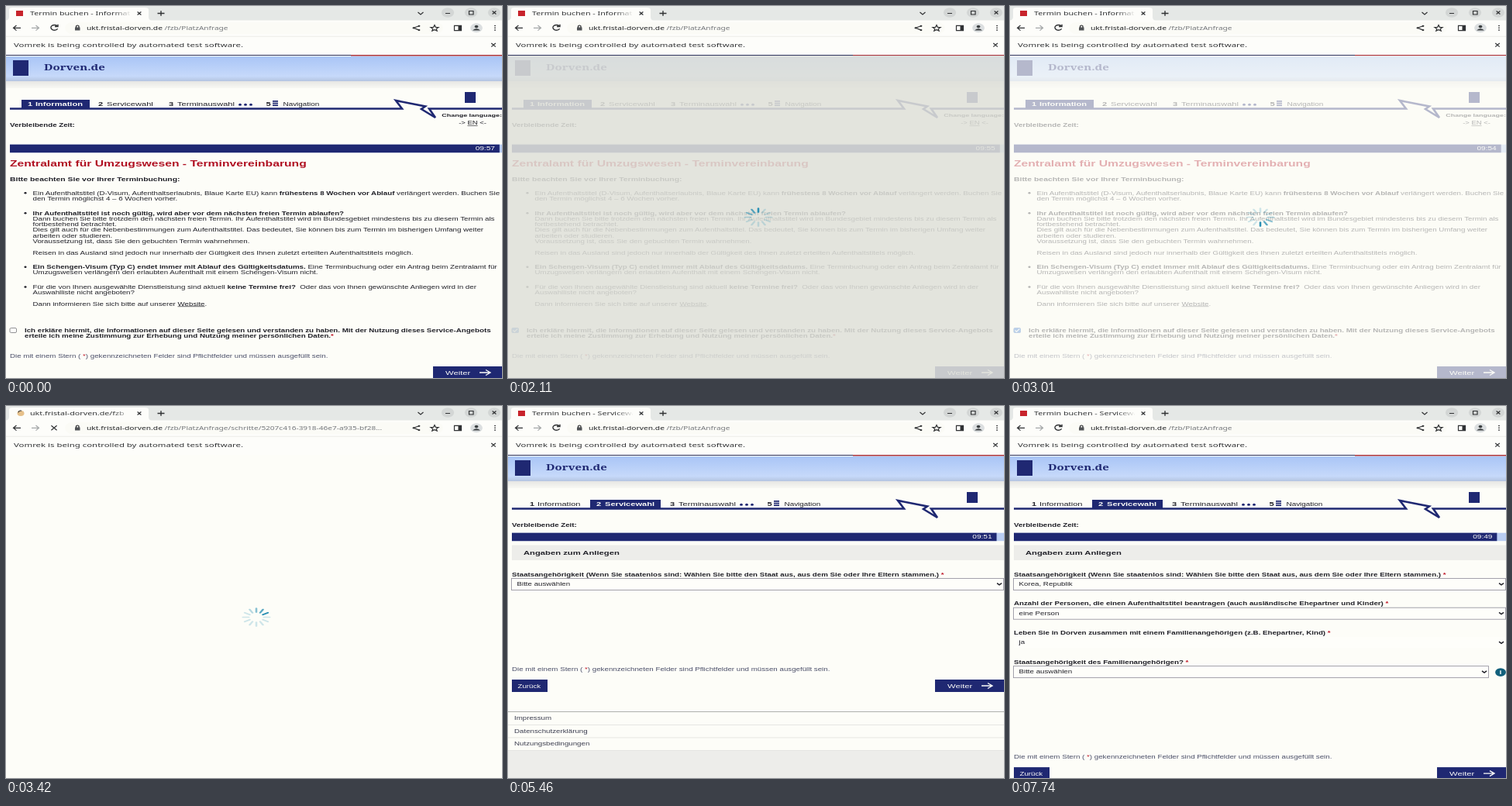
These frames come from a looping animation (640x480 px, 8 s). An HTML page:

```html
<!DOCTYPE html>
<html lang="de">
<head>
<meta charset="utf-8">
<title>Termin buchen</title>
<style>
html, body { margin: 0; width: 100%; height: 100%; overflow: hidden; background: #fdfdf8; }
svg { display: block; width: 640px; height: 480px; }
text { font-family: "Liberation Sans", Arial, sans-serif; fill: #202028; }
.ui text { font-family: "Noto Sans", "Open Sans", sans-serif; fill: #303234; }
.b { font-weight: bold; }
.u { text-decoration: underline; }
.r { fill: #c01828; }
.ln { fill: none; stroke: #303234; stroke-width: 1.2; }
</style>
</head>
<body>
<svg id="stage" viewBox="0 0 640 480"></svg>
<script>
const LOOP = 8000, WIDE = 1.5, ROW = 37.7;
const NAVY = '#1f2872', PAGE = '#fdfdf8', SKY = '#b9cdf2', BAND = '#ededea', BAR = '#fdfdfa';
const LEAVE = 2110, BLANK = 3300, NEXT = 4150, LOADED = 5030, READY = 5460;

// Markup helpers. The screen is shown 1.5 times too wide, so all text shares one scale.
const rich = s => String(s).replace(/<(\/?)([bur])>/g, (_, end, c) => end ? '</tspan>' : `<tspan class="${c}">`);
const text = (x, y, s, size = 6.5, more = '') =>
  `<text transform="translate(${x} ${y}) scale(${WIDE} 1)" font-size="${size}" ${more}>${rich(s)}</text>`;
const bold = (x, y, s, size, more = '') => text(x, y, s, size, 'font-weight="bold" ' + more);
const white = 'style="fill:#fdfdfa"';
const rect = (x, y, w, h, fill, more = '') =>
  `<rect x="${x}" y="${y}" width="${w}" height="${h}" fill="${fill}" ${more}/>`;
const line = (d, more = '') => `<path class="ln" d="${d}" ${more}/>`;
const dot = (x, y, r, fill) => `<ellipse cx="${x}" cy="${y}" rx="${r * 1.3}" ry="${r}" fill="${fill}"/>`;
const during = (from, to, s) => `<g data-from="${from}" data-to="${to}">${s}</g>`;
const cross = (x, y, r = 2.5) =>
  line(`M${x - r * 1.2} ${y - r}l${r * 2.4} ${r * 2}m0 ${-r * 2}l${-r * 2.4} ${r * 2}`);

function browser() {
  const host = 'ukt.fristal-dorven.de', path = '/fzb/PlatzAnfrage';
  const title = s => text(31, 12.3, s, 7.15);
  const tail = s => text(204.5, 31, s, 6.7, 'style="fill:#73767a"');
  const reload = line('M66 25.6A4.6 3.4 0 1 0 66.6 29.4M67 23.8v2.7h-4', 'style="stroke-width:1.4"');
  const brand = rect(13, 6, 9, 7, '#c8242c');
  return `<g class="ui">
    ${rect(0, 0, 640, 19, '#e5e8e6')}
    <path d="M0 18.5Q4 18 4 14V5Q4 2 8 2H179Q184 2 184 5V14Q184 18.5 188 18.5H640V40H0Z" fill="${BAR}"/>
    ${rect(76, 21, 488, 15, '#fbfbf6', 'rx="9" ry="7.5"')}
    ${rect(0, 39, 640, 24, BAR)}
    ${line('M0 39.3H640', 'style="stroke:#e6e7e2;stroke-width:.7"')}
    ${during(0, BLANK, brand + title('Termin buchen - Information'))}
    ${during(BLANK, NEXT, title(host + '/fzb') +
      `<ellipse cx="19" cy="9.5" rx="4.5" ry="3.4" fill="#e6c08a"/>
       <path id="wheel" class="ln" d="M0 -3.4A3.4 3.4 0 0 1 3.4 0"/>`)}
    ${during(NEXT, LOADED, title('Termin buchen') +
      '<ellipse class="ln" cx="18.5" cy="9.5" rx="3.5" ry="3.3"/>' + line('M15.5 10l3-1 1 2 2-3'))}
    ${during(LOADED, LOOP, brand + title('Termin buchen - Servicewahl'))}
    ${rect(138, 4, 24, 13, 'url(#fade)')}${rect(161, 4, 21, 13, BAR)}
    ${cross(172, 9.5, 2)}${line('M195.5 9.5h9M200 6.2v6.6', 'style="stroke-width:1.4"')}
    ${line('M531.5 8l3.5 3 3.5-3')}
    ${[570, 600, 630].map(x => dot(x, 8.5, 6.2, '#d3d6d5')).join('')}
    ${line('M567 9.5h6M597.5 6.5h5.5v4.5h-5.5z')}${cross(630, 8.5, 2)}
    ${line('M19 28.3H10M13.5 25l-4 3.3 4 3.3')}
    ${line('M33 28.3h9M38.5 25l4 3.3-4 3.3', 'style="stroke:#a4a7a8"')}
    ${during(0, BLANK, reload)}${during(BLANK, LOADED, cross(62, 28.3, 3))}${during(LOADED, LOOP, reload)}
    ${rect(89, 27.5, 6.5, 4, '#505356')}${line('M90.5 28v-2q1.7-2 3.5 0v2')}
    ${text(104, 31, host, 6.85, 'style="fill:#202224"')}
    ${during(0, BLANK, tail(path))}
    ${during(BLANK, NEXT, tail(path + '/schritte/5207c416-3918-46e7-a935-bf28...'))}
    ${during(NEXT, LOOP, tail(path))}
    ${line('M533 25.8l-7 2.5 7 2.8')}
    ${dot(533, 25.8, 1.1, '#303234')}${dot(526, 28.3, 1.1, '#303234')}${dot(533, 31.1, 1.1, '#303234')}
    ${line('M553 24.6l1.4 2.7 3.6.2-2.8 1.9 1 2.7-3.2-1.5-3.2 1.5 1-2.7-2.8-1.9 3.6-.2z')}
    ${line('M578.5 25.3h9v6.4h-9z')}${rect(583.5, 25, 4.5, 7, '#303234')}
    ${dot(607, 28.3, 6, '#dcdfe0')}${dot(607, 26.6, 1.8, '#3c4042')}
    <path d="M602 31.5q5-4.5 10 0z" fill="#3c4042"/>
    ${[25.5, 28.3, 31.1].map(y => dot(631, y, .8, '#303234')).join('')}
    ${text(10, 53, 'Vomrek is being controlled by automated test software.', 7.6)}
    ${cross(629, 50.3, 2.3)}
  </g>`;
}

// Banner, step tabs and remaining time; `y` is the top of the time bar.
function header(step, y) {
  const tab = (n, x, gap, name) => n === step
    ? bold(x, 128.7, n, 7.4, white) + bold(x + gap, 128.7, name, 7.4, white)
    : bold(x, 128.7, n, 7.4) + text(x + gap, 128.7, name, 7.4);
  const shift = step - 1;
  return `
    ${rect(0, 62, 640, 418, PAGE)}
    ${rect(0, 65, 640, 32, 'url(#sky)')}${rect(0, 97, 640, 9, 'url(#sand)')}
    ${rect(0, 62, 640, 2, '#2c3260')}${rect(445, 62.5, 195, 2, '#a8303c')}
    ${rect(9, 70, 20, 20, NAVY)}
    ${bold(49, 82.5, 'Dorven.de', 10, `style="font-family:'Noto Serif',serif;fill:${NAVY}"`)}
    ${shift ? rect(106, 121, 91, 12, NAVY) : rect(20, 121, 88, 12, NAVY)}
    ${tab(1, 28, 10, 'Information')}
    ${tab(2, 119 - 5 * shift, 11, 'Servicewahl')}
    ${tab(3, 210 - shift, 11, 'Terminauswahl')}
    ${[302, 309, 316].map(x => dot(x - shift, 127.3, 1.5, NAVY)).join('')}
    ${bold(335.5 - shift, 128.7, 5, 7.4)}
    ${[122, 124.7, 127.4].map(v => rect(344 - shift, v, 7, 1.7, NAVY)).join('')}
    ${text(357.5 - shift, 128.5, 'Navigation', 6.6)}
    <path d="M5 132.5H511L503 122 541 129.5 536 133 554 144 546 132.5H640" fill="none" stroke="${NAVY}" stroke-width="2.6"/>
    ${rect(592, 111, 14, 14, NAVY)}
    ${bold(5, 156.2, 'Verbleibende Zeit:')}
    ${rect(5, y, 635, 10.5, SKY)}${rect(5, y, 14, 10.5, NAVY, `id="bar${step}"`)}
    ${text(0, y + 7.7, '', 6.7, `id="clock${step}" text-anchor="end" ${white}`)}`;
}

const arrow = y => `<path d="M611 ${y}h13M619 ${y - 3.5}l6 3.5-6 3.5" fill="none" stroke="#fdfdfa" stroke-width="1.3"/>`;
const forward = y => rect(551, y, 89, 16, NAVY) + text(567, y + 10.6, 'Weiter', 7.5, white) + arrow(y + 8);
const note = y => text(5, y, 'Die mit einem Stern ( <r>*</r>) gekennzeichneten Felder sind Pflichtfelder und müssen ausgefüllt sein.',
  6.5, 'style="fill:#4a4e68"');

function infoPage() {
  const lines = [
    [243.5, 'Ein Aufenthaltstitel (D-Visum, Aufenthaltserlaubnis, Blaue Karte EU) kann <b>frühestens 8 Wochen vor Ablauf</b> verlängert werden. Buchen Sie', 1],
    [251, 'den Termin möglichst 4 – 6 Wochen vorher.'],
    [269.5, '<b>Ihr Aufenthaltstitel ist noch gültig, wird aber vor dem nächsten freien Termin ablaufen?</b>', 1],
    [276.7, 'Dann buchen Sie bitte trotzdem den nächsten freien Termin. Ihr Aufenthaltstitel wird im Bundesgebiet mindestens bis zu diesem Termin als'],
    [284, 'fortbestehend betrachtet.'],
    [291.3, 'Dies gilt auch für die Nebenbestimmungen zum Aufenthaltstitel. Das bedeutet, Sie können bis zum Termin im bisherigen Umfang weiter'],
    [298.5, 'arbeiten oder studieren.'],
    [305.8, 'Voraussetzung ist, dass Sie den gebuchten Termin wahrnehmen.'],
    [320.7, 'Reisen in das Ausland sind jedoch nur innerhalb der Gültigkeit des Ihnen zuletzt erteilten Aufenthaltstitels möglich.'],
    [339, '<b>Ein Schengen-Visum (Typ C) endet immer mit Ablauf des Gültigkeitsdatums.</b> Eine Terminbuchung oder ein Antrag beim Zentralamt für', 1],
    [346.3, 'Umzugswesen verlängern den erlaubten Aufenthalt mit einem Schengen-Visum nicht.'],
    [364.7, 'Für die von Ihnen ausgewählte Dienstleistung sind aktuell <b>keine Termine frei?</b>&#160; Oder das von Ihnen gewünschte Anliegen wird in der', 1],
    [372, 'Auswahlliste nicht angeboten?'],
    [386.7, 'Dann informieren Sie sich bitte auf unserer <u>Website</u>.']
  ];
  return header(1, 178.7) + `
    ${bold(640, 143.3, 'Change language:', 6, 'text-anchor="end"')}
    ${text(602, 153.3, '-&gt; <u>EN</u> &lt;-', 6.3, 'text-anchor="middle"')}
    ${bold(5, 207.3, 'Zentralamt für Umzugswesen - Terminvereinbarung', 10.45, 'style="fill:#b00f22"')}
    ${bold(5, 225.6, 'Bitte beachten Sie vor Ihrer Terminbuchung:', 6.95)}
    ${lines.map(([y, s, mark]) => text(34.5, y, s) + (mark ? dot(25, y - 2.2, 1.2, '#202028') : '')).join('')}
    ${rect(5, 415.5, 8.5, 6, '#fffffc', 'rx="1.5" stroke="#77777c" stroke-width=".8"')}
    ${during(900, BLANK, rect(4.7, 415.2, 9.2, 6.6, '#2f73d0', 'rx="1.5"') +
      '<path d="M6.5 418.5l2 1.7 3.8-3.5" fill="none" stroke="#fff" stroke-width="1.1"/>')}
    ${bold(24, 420.6, 'Ich erkläre hiermit, die Informationen auf dieser Seite gelesen und verstanden zu haben. Mit der Nutzung dieses Service-Angebots')}
    ${bold(24, 428, 'erteile ich meine Zustimmung zur Erhebung und Nutzung meiner persönlichen Daten.<r>*</r>')}
    ${note(454.3)}${forward(465)}`;
}

const fields = [
  ['Staatsangehörigkeit (Wenn Sie staatenlos sind: Wählen Sie bitte den Staat aus, aus dem Sie oder Ihre Eltern stammen.)', 'Korea, Republik'],
  ['Anzahl der Personen, die einen Aufenthaltstitel beantragen (auch ausländische Ehepartner und Kinder)', 'eine Person'],
  ['Leben Sie in Dorven zusammen mit einem Familienangehörigen (z.B. Ehepartner, Kind)', 'ja'],
  ['Staatsangehörigkeit des Familienangehörigen?', '']
];

function formPage() {
  const field = ([label], i) => {
    const w = i === 3 ? 613 : 635;
    return `<g class="field" transform="translate(0 ${i * ROW})">
      ${bold(5, 219.6, label + ' <r>*</r>')}
      ${rect(4.5, 222.5, w, 15, '#fefefa', 'stroke-width=".9"')}
      ${text(11.5, 232, 'Bitte auswählen', 6.5, 'class="value"')}
      <path d="M${w - 4} 228.7l3 2.2 3-2.2" fill="none" stroke="#202028" stroke-width="1.5"/>
      ${i === 3 ? dot(633, 230.5, 5.3, '#12607c') + bold(633, 233, 'i', 7, 'text-anchor="middle" ' + white) : ''}
    </g>`;
  };
  const links = ['Impressum', 'Datenschutzerklärung', 'Nutzungsbedingungen'];
  return header(2, 163.7) + `
    ${rect(5, 179.5, 635, 19.5, BAND)}${bold(20, 192, 'Angaben zum Anliegen', 7.5)}
    ${fields.map(field).join('')}
    <g id="foot">
      ${note(342.3)}
      ${rect(5, 353, 46, 16, NAVY)}${text(12.5, 363.6, 'Zurück', 6.5, white)}${forward(353)}
      ${rect(0, 394, 640, .9, '#a5a7a6')}
      ${links.map((s, i) => text(8, 405 + 16.6 * i, s, 6.5, 'style="fill:#3c3e50"') +
        rect(0, 411 + 16.6 * i, 640, .7, '#dcdcd8')).join('')}
      ${rect(0, 445, 640, 150, BAND)}
    </g>`;
}

const spokes = Array.from({ length: 12 }, (_, i) =>
  `<path class="spoke" d="M0 -6.5V-11.5" stroke-width="1.7" stroke-linecap="round" transform="rotate(${i * 30})"/>`).join('');

const hue = (at, c, o = 1) => `<stop offset="${at}" stop-color="${c}" stop-opacity="${o}"/>`;
const shade = (id, s, dir = 'x2="0" y2="1"') => `<linearGradient id="${id}" ${dir}>${s}</linearGradient>`;
const stage = document.getElementById('stage');
stage.innerHTML = `<defs>
    ${shade('fade', hue(0, BAR, 0) + hue(1, BAR), '')}
    ${shade('sky', hue(0, '#a9c5f6') + hue(.8, '#c6d9fa') + hue(1, '#b4c4e0'))}
    ${shade('sand', hue(0, '#e6e6e4') + hue(1, '#f8f8f3'))}
  </defs>
  ${during(0, BLANK, infoPage())}
  ${during(BLANK, NEXT, rect(0, 62, 640, 418, PAGE) + rect(0, 62, 640, 1, '#d8dad6'))}
  ${during(NEXT, LOOP, formPage())}
  ${during(LEAVE, BLANK, rect(0, 64, 640, 416, PAGE, 'id="veil"'))}
  ${during(LEAVE, NEXT, `<g transform="translate(323 272.5) scale(${WIDE} 1)" fill="none" stroke="#2a90b4">${spokes}</g>`)}
  ${browser()}`;

const $ = id => document.getElementById(id);
const all = q => [...stage.querySelectorAll(q)];
const timed = all('[data-from]').map(el => [el, +el.dataset.from, +el.dataset.to]);
const fieldEls = all('.field'), spokeEls = all('.spoke');
const mix = (a, b, p) => a + (b - a) * p;
const passed = (t, ...times) => times.filter(at => t >= at).length;

function setClock(id, y, sec) {
  const end = 5 + 635 * sec / 600;
  $('bar' + id).setAttribute('width', end - 5);
  $('clock' + id).setAttribute('transform', `translate(${end - 6} ${y + 7.7}) scale(${WIDE} 1)`);
  $('clock' + id).textContent = sec > 540 ? '09:' + (sec - 540) : '';
}

function draw(t) {
  for (const [el, from, to] of timed) el.style.display = t >= from && t < to ? '' : 'none';
  setClock(1, 178.7, 597 - passed(t, 760, 1750, 2750));
  setClock(2, 163.7, t < READY ? 13 : 591 - passed(t, 6460, 7470));

  const count = 1 + passed(t, 7230, 7470, 7740);
  fieldEls.forEach((el, i) => {
    el.style.display = i < count ? '' : 'none';
    el.querySelector('.value').textContent = i < count - 1 ? fields[i][1] : 'Bitte auswählen';
    el.querySelector('rect').setAttribute('stroke', i === count - 2 ? PAGE : '#9a98a4');
  });
  $('foot').setAttribute('transform', `translate(0 ${(count - 1) * ROW})`);

  const p = Math.min(1, Math.max(0, (t - LEAVE) / 900));
  $('veil').setAttribute('fill', `rgb(${mix(224, 253, p)},${mix(225, 253, p)},${mix(218, 246, p)})`);
  $('veil').setAttribute('opacity', mix(.88, .68, p));

  const turn = 345 + .6 * (t - LEAVE), head = Math.round(turn / 30);
  spokeEls.forEach((el, i) => {
    const age = ((head - i) % 12 + 12) % 12;
    el.setAttribute('opacity', Math.max(.22, 1 - age * .22));
  });
  $('wheel').setAttribute('transform', `translate(19 9.5) rotate(${t * .4})`);
}

const start = performance.now();
(function tick() {
  draw((performance.now() - start) % LOOP);
  requestAnimationFrame(tick);
})();
</script>
</body>
</html>
```
